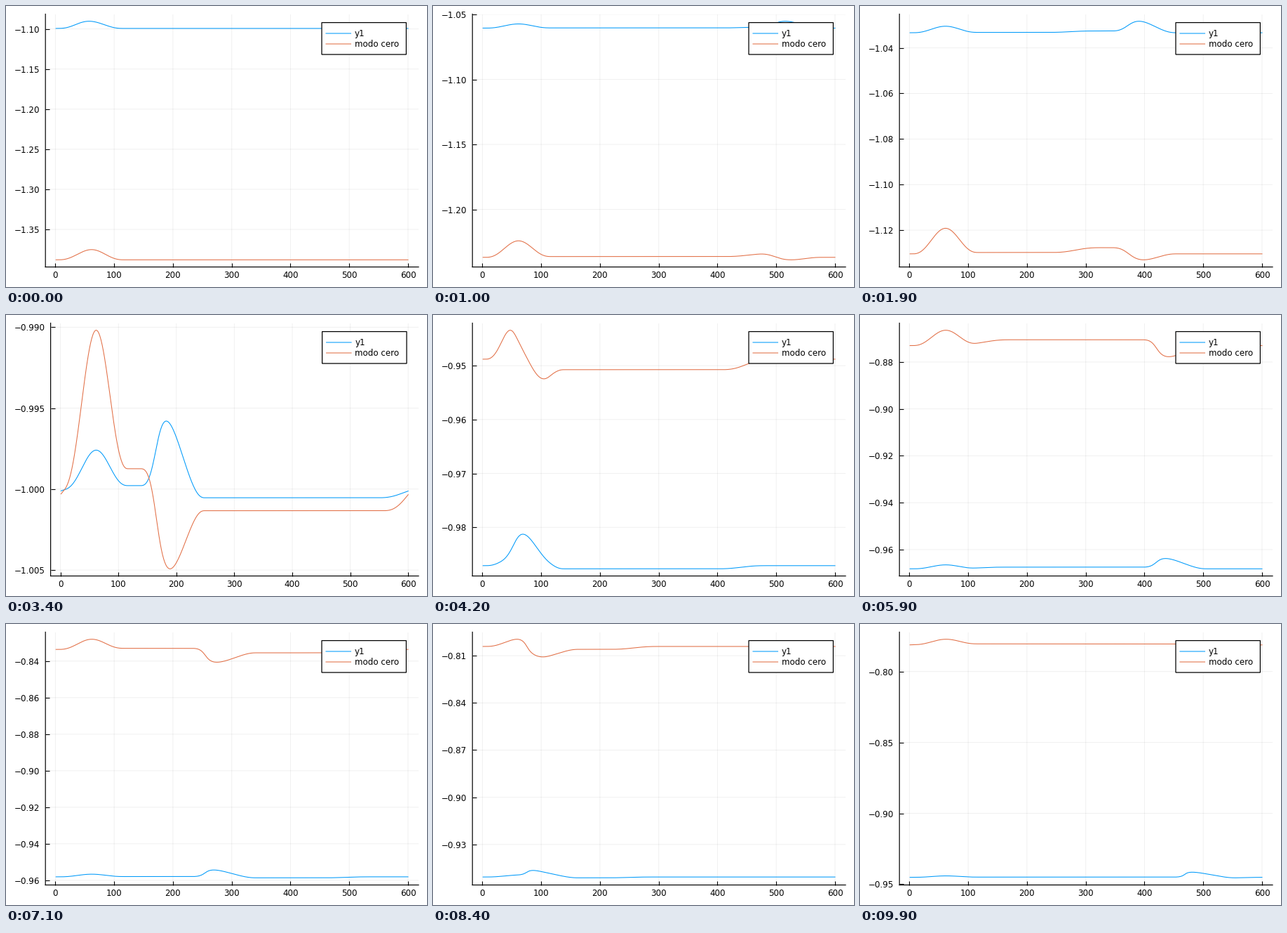
Animation of 600 by 400 pixels, one loop 10000 ms. Source, as a matplotlib script:

```python
import numpy as np
import matplotlib.pyplot as plt
from matplotlib.animation import FuncAnimation
from matplotlib.patches import Rectangle

W, H, DPI = 600, 400, 100
FRAMES, INTERVAL = 100, 100
PERIOD = 600
TOP, BOTTOM, RIGHT, LEFT = 11.5, 371.5, 588, 56.2
PX = 72 / DPI
BLUE, RED = "#009AFA", "#E26F46"

plt.rcParams.update({"font.family": "DejaVu Sans", "font.size": 11.9 * PX,
                     "path.snap": False})

x = np.arange(1, PERIOD + 1)
theta = np.linspace(-np.pi, np.pi, 201)
HUMP = ((1 + np.cos(theta)) / 2) ** 1.25
STEP = (1 + theta / np.pi + np.sin(theta) / np.pi) / 2


def pulse(center, width, skew=0.0):
    """Hump and staircase of a periodic pulse whose crest leans left by skew."""
    xs = width * theta / np.pi - skew * HUMP
    shifted = x - center + PERIOD / 2
    d = shifted % PERIOD - PERIOD / 2
    hump = np.interp(d, xs, HUMP, left=0, right=0)
    step = np.interp(d, xs, STEP) + np.floor(shifted / PERIOD)
    return hump, step


def ripples(n):
    """Disturbances of both fields on top of their mean level."""
    bump, bump_step = pulse(61, 55.5)
    wave, wave_step = pulse(59.5 - 13.7 * n, 55, 4 + 0.165 * n)

    def mix(source, crest, jump, rise, start):
        ramp_step = pulse(start - 18.85 * n, 45)[1]
        return (source * bump + crest * wave + jump * bump_step
                + rise * ramp_step - (jump + rise) * wave_step)

    blue = mix(0.0036 * np.exp(-0.0136 * n),
               0.0036 + 0.0016 * np.exp(-n / 45),
               0.00015, 0.00065 - 1.5e-6 * n, 32)
    red = mix(0.01425 * np.exp(-0.014 * n),
              -0.008 + 0.0058 * np.exp(-n / 58),
              0.0006, 0.0018 + 0.0006 * np.exp(-n / 30), 41)
    return blue, red


# Value of each field at the left edge, sampled along the relaxation
TIMES = [0, 19, 34, 42, 59, 84, 99]
EDGES = [[-1.0994, -1.03335, -1.00011, -0.9871, -0.9682, -0.9507, -0.9451],
         [-1.3879, -1.1304, -1.0003, -0.9488, -0.8730, -0.8041, -0.7812]]
LIMITS = [-0.9333, -0.73]
LOGS = [[np.log(limit - (edge - ripples(t)[i][0]))
         for t, edge in zip(TIMES, EDGES[i])]
        for i, limit in enumerate(LIMITS)]


def fields(n):
    return [limit - np.exp(np.interp(n, TIMES, logs)) + r
            for limit, logs, r in zip(LIMITS, LOGS, ripples(n))]


def nice_ticks(lo, hi):
    """Best scoring set of four to eight round ticks, with its decimals."""
    best = (-np.inf, None, 0)
    for z in range(-5, 1):
        for q, nice in ((1, 1), (5, 0.9), (2, 0.7), (2.5, 0.5), (3, 0.2)):
            step = q * 10.0 ** z
            first = int(np.ceil(lo / step - 1e-9))
            last = int(np.floor(hi / step + 1e-9))
            count = last - first + 1
            if not 4 <= count <= 8:
                continue
            score = ((1 - abs(count - 5) / 5) / 4
                     + 0.5 * (hi - lo) / ((count - 1) * step) + nice / 4)
            if score > best[0]:
                ticks = step * np.arange(first, last + 1)
                best = (score, ticks, max(0, -z) + (q == 2.5))
    return best[1], best[2]


def padded(lo, hi):
    pad = 0.03 * (hi - lo)
    return lo - pad, hi + pad


fig = plt.figure(figsize=(W / DPI, H / DPI), dpi=DPI, facecolor="white")
ax = fig.add_axes([0.1, 0.1, 0.8, 0.8])
ax.set_xlim(*padded(1, PERIOD))
ax.set_xticks(range(0, PERIOD + 1, 100))
ax.set_axisbelow(True)
ax.grid(color="black", alpha=0.06, lw=1 * PX)
ax.spines[["top", "right"]].set_visible(False)
for side in ("left", "bottom"):
    ax.spines[side].set_linewidth(1.2 * PX)
ax.tick_params(direction="in", length=6 * PX, width=1.1 * PX)
ax.tick_params(axis="x", pad=5.8 * PX)
ax.tick_params(axis="y", pad=8.3 * PX)
curves = [ax.plot([], [], color=c, lw=1.05 * PX)[0] for c in (BLUE, RED)]

# Legend on a pixel grid above the plot
top = fig.add_axes([0, 0, 1, 1], zorder=5)
top.set_axis_off()
box = top.add_patch(Rectangle((450, 23.6), 120.4, 45.4, fc="white",
                              ec="black", lw=1.25 * PX))
keys, names = [], []
for y, color, name in ((39, BLUE, "y1"), (54, RED, "modo cero")):
    keys.append(top.plot([456, 491.5], [y, y], color=color, lw=1.05 * PX)[0])
    names.append(top.text(496.6, y + 4.2, name, va="baseline"))
top.set_xlim(0, W)
top.set_ylim(H, 0)


def draw(n):
    data = fields(n)
    lo, hi = padded(np.min(data), np.max(data))
    ticks, digits = nice_ticks(lo, hi)
    labels = [f"{t:.{digits}f}".replace("-", "\u2212") for t in ticks]
    left = LEFT + 7.4 * (digits - 2)

    ax.set_position([left / W, 1 - BOTTOM / H,
                     (RIGHT - left) / W, (BOTTOM - TOP) / H])
    ax.set_yticks(ticks, labels)
    ax.set_ylim(lo, hi)
    for curve, values in zip(curves, data):
        curve.set_data(x, values)

    dx = 0.08 * (left - LEFT)
    box.set_x(450 + dx)
    for key, name in zip(keys, names):
        key.set_xdata([456 + dx, 491.5 + dx])
        name.set_x(496.6 + dx)
    return curves


anim = FuncAnimation(fig, draw, frames=FRAMES, interval=INTERVAL,
                     repeat=True, repeat_delay=0, blit=False)
plt.show()
```
